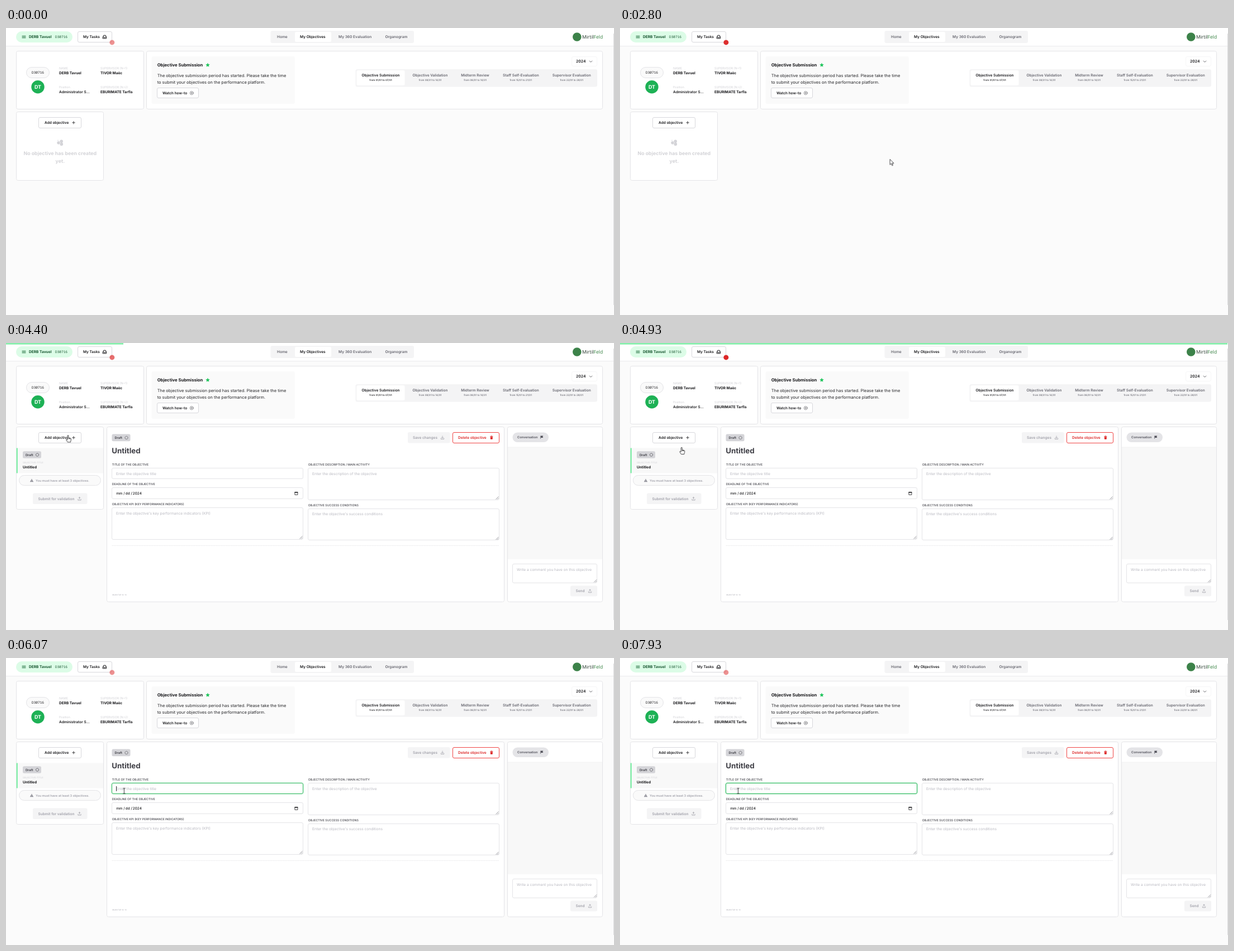
An HTML page for the animation above (8 s loop, 1088 px wide and 515 px high).

```html
<!DOCTYPE html>
<html lang="en">
<head>
<meta charset="utf-8">
<title>My Objectives</title>
<style>
html, body { margin: 0; width: 100%; height: 100%; overflow: hidden; background: #fbfbfb; }
svg { display: block; width: 100vw; height: 100vh; }
text { font: 600 6.5px Inter, "Open Sans", sans-serif; fill: #18181b; white-space: pre; text-rendering: geometricPrecision; }
.mid { text-anchor: middle; }
.mono { font: 500 6.1px "Noto Sans Mono", "DejaVu Sans Mono", monospace; }
.bold { font-weight: 700; }
.nav { font-size: 6.6px; }
.soft { fill: #66666f; }
.mute { fill: #a1a1aa; }
.label { font-size: 5.3px; font-weight: 400; fill: #cfcfd4; }
.field { font-size: 5.24px; font-weight: 500; fill: #3f3f46; }
.hint { font-size: 6.63px; font-weight: 400; fill: #b9b9c0; }
.part { font-size: 6.4px; font-weight: 500; }
.date { font-size: 4.45px; font-weight: 500; }
.body { font-size: 7.45px; font-weight: 400; fill: #27272a; }
.empty { font-size: 8.85px; font-weight: 700; fill: #d4d4d8; }

.card { fill: #fff; stroke: #e4e4e7; }
.btn { fill: #fff; stroke: #d8d8dc; }
.box { fill: #fff; stroke: #e4e4e7; }
.off { fill: #f4f4f5; }
.line { fill: none; stroke: #3f3f46; stroke-width: .8; stroke-linecap: round; stroke-linejoin: round; }
.pale { stroke: #a1a1aa; }

/* one shared 8 s timeline */
.before, .after, .caret, .arrow, .hand, .beam, .hover { animation: 8s step-end infinite; }
.before { animation-name: before; }
.after { animation-name: after; }
.caret { animation-name: caret; }
.arrow { animation-name: arrow; }
.hand { animation-name: hand; }
.beam { animation-name: beam; }
.hover { fill: #f8f8f9; animation-name: hover; }
@keyframes before { 0% { opacity: 1 } 54.9%, 100% { opacity: 0 } }
@keyframes after { 0% { opacity: 0 } 54.9%, 100% { opacity: 1 } }
@keyframes caret { 0% { opacity: 0 } 75% { opacity: 1 } 81.25% { opacity: 0 } 87.5% { opacity: 1 } 93.75%, 100% { opacity: 0 } }
@keyframes arrow { 0% { opacity: 1 } 54%, 100% { opacity: 0 } }
@keyframes hand { 0% { opacity: 0 } 54% { opacity: 1 } 68.1%, 100% { opacity: 0 } }
@keyframes beam { 0% { opacity: 0 } 68.1%, 100% { opacity: 1 } }
@keyframes hover { 0% { opacity: 0 } 43.5% { opacity: 1 } 54%, 100% { opacity: 0 } }

.press { transform-origin: 96.5px 170px; animation: press 8s linear infinite; }
@keyframes press { 0%, 46.6% { transform: none } 47.8%, 49.2% { transform: scale(.95) } 50.6%, 100% { transform: none } }

.bar { transform-origin: 0 0; animation: bar 8s linear infinite; }
@keyframes bar {
  0%, 54% { transform: scaleX(0); opacity: 1 }
  55% { transform: scaleX(.19); opacity: 1 }
  58.5%, 62.5% { transform: scaleX(1); opacity: 1 }
  65.8%, 100% { transform: scaleX(1); opacity: 0 }
}
.ring { animation: ring 8s linear infinite; }
@keyframes ring { 0%, 74.8% { opacity: 0 } 76%, 100% { opacity: 1 } }

.dot { fill: #dc2626; animation: pulse 2s cubic-bezier(.4, 0, .6, 1) -1s infinite; }
@keyframes pulse { 0%, 100% { opacity: 1 } 50% { opacity: .5 } }

.pointer { animation: roam 8s linear infinite; }
@keyframes roam {
  0%, 5.25% { transform: translate(1094px, 520px) }
  10.875% { transform: translate(976px, 430px) }
  19.125% { transform: translate(795px, 314px) }
  21.625% { transform: translate(744px, 288px) }
  32.5% { transform: translate(593px, 256px) }
  43.375% { transform: translate(117px, 167px) }
  47%, 54% { transform: translate(110.5px, 165px) }
  55%, 58% { transform: translate(111px, 165.3px) }
  66%, 66.7% { transform: translate(109.3px, 213px) }
  70.6% { transform: translate(285px, 297px) }
  74.4%, 100% { transform: translate(211.5px, 238.5px) }
}
</style>
</head>
<body>
<svg viewBox="0 0 1088 515">
  <defs>
    <g id="draft">
      <rect width="33" height="12.6" rx="2.5" fill="#d4d4d8"/>
      <text x="5" y="8.5" style="font-size:5.65px;fill:#3f3f46">Draft</text>
      <circle class="line" cx="26" cy="6.4" r="2.6" stroke-dasharray="1 1.3"/>
    </g>
    <path id="upload" d="M-2.6 1V2.8H2.6V1M0 1V-2.8M-1.5 -1.4L0 -2.9L1.5 -1.4"/>
    <path id="download" d="M-2.6 1V2.8H2.6V1M0 -2.8V1M-1.5 -.4L0 1.1L1.5 -.4"/>
    <path id="grip" d="M-5 0L0 -5M-2.3 0L0 -2.3" fill="none" stroke="#71717a" stroke-width=".7"/>
  </defs>

  <!-- header -->
  <rect width="1088" height="32" fill="#fff"/>
  <path d="M0 32.5H1087" stroke="#ebebed"/>
  <rect x="18" y="6" width="101" height="20" rx="10" fill="#dcfce7"/>
  <path class="line" d="M29 14.2H35M29 16H35M29 17.8H35" style="stroke:#166534"/>
  <text class="bold" x="41" y="18.3" style="font-size:6.6px;fill:#14532d">DERB Tavuel</text>
  <text class="mono" x="88" y="18.3" style="fill:#14532d">D30716</text>
  <rect class="btn" x="128.5" y="6.5" width="61" height="19" rx="2.5"/>
  <text x="138" y="18.3">My Tasks</text>
  <path class="line" d="M173.5 16.3L174.7 13.2H178.3L179.5 16.3V18.8H173.5ZM173.5 16.3H175.3L175.8 17.3H177.2L177.7 16.3H179.5" style="stroke:#18181b;stroke-width:1"/>
  <rect class="off" x="473.5" y="5" width="256.5" height="22" rx="3"/>
  <rect x="517" y="7" width="65" height="18" rx="2.5" fill="#fff"/>
  <text class="nav soft" x="485" y="18.3">Home</text>
  <text class="nav" x="526" y="18.3">My Objectives</text>
  <text class="nav soft" x="595" y="18.3">My 360 Evaluation</text>
  <text class="nav soft" x="678.5" y="18.3">Organogram</text>
  <circle cx="1021.8" cy="16" r="7.8" fill="#3c8249"/>
  <text x="1031" y="19.2" style="font:500 8.5px 'Open Sans',sans-serif;fill:#1f3326">Mirtil<tspan fill="#2f7d3b">Feld</tspan></text>

  <!-- profile -->
  <rect class="card" x="18.5" y="41.5" width="228" height="104" rx="3"/>
  <rect x="36.5" y="70.5" width="41" height="19" rx="9.5" fill="#fafafa" stroke="#e4e4e7"/>
  <text class="mono mid" x="57" y="82.2">D30716</text>
  <circle cx="57" cy="105.7" r="11.7" fill="#1db155"/>
  <text class="mid bold" x="57" y="109" style="font-size:9px;fill:#fff">DT</text>
  <text class="label" x="95" y="73.8">NAME</text>
  <text class="bold" x="95" y="82.8">DERB Tavuel</text>
  <text class="label" x="169" y="73.8">SUPERVISOR (N+1)</text>
  <text class="bold" x="169" y="82.8">TIVOR Maëc</text>
  <text class="label" x="95" y="107.8">Position</text>
  <text x="95" y="117.2">Administrator S...</text>
  <text class="label" x="169" y="107.8">SUPERVISOR (N+2)</text>
  <text class="bold" x="169" y="117.2">EBURIMATE Tarfis</text>

  <!-- period -->
  <rect class="card" x="251.5" y="41.5" width="816" height="104" rx="3"/>
  <rect x="260.5" y="51" width="256.5" height="85" rx="3" fill="#fafafa"/>
  <text class="bold" x="270.7" y="69" style="font-size:7.7px">Objective Submission</text>
  <path d="M361 62.4L362.1 64.9L364.8 65.2L362.8 67L363.4 69.7L361 68.3L358.6 69.7L359.2 67L357.2 65.2L359.9 64.9Z" fill="#22c55e"/>
  <text class="body" x="270.7" y="88">The objective submission period has started. Please take the time</text>
  <text class="body" x="270.7" y="99.6">to submit your objectives on the performance platform.</text>
  <rect class="btn" x="270.5" y="107.5" width="74" height="18" rx="2.5"/>
  <text x="280" y="119">Watch how-to</text>
  <circle class="line" cx="332.3" cy="116.7" r="3" style="stroke-width:.6"/>
  <path d="M331.5 115.3V118.1L333.8 116.7Z" fill="#3f3f46"/>
  <rect x="1012.5" y="51.5" width="45" height="17" rx="2.5" fill="#fff" stroke="#f6f6f7"/>
  <text x="1020" y="62.3" style="font-size:6.85px">2024</text>
  <path class="line" d="M1044.2 59L1046.5 61.3L1048.8 59"/>
  <rect class="off" x="625.5" y="74" width="432.5" height="31.5" rx="3"/>
  <rect x="627.5" y="76" width="86" height="27" rx="2.5" fill="#fff"/>
  <g class="mid">
    <text x="670.5" y="87.3">Objective Submission</text>
    <text class="date" x="670.5" y="95.3">from 01/01 to 07/01</text>
    <text class="soft" x="759" y="87.3">Objective Validation</text>
    <text class="date soft" x="759" y="95.3">from 08/01 to 14/01</text>
    <text class="soft" x="839.5" y="87.3">Midterm Review</text>
    <text class="date soft" x="839.5" y="95.3">from 08/01 to 14/01</text>
    <text class="soft" x="921.3" y="87.3">Staff Self-Evaluation</text>
    <text class="date soft" x="921.3" y="95.3">from 15/01 to 21/01</text>
    <text class="soft" x="1012.2" y="87.3">Supervisor Evaluation</text>
    <text class="date soft" x="1012.2" y="95.3">from 22/01 to 28/01</text>
  </g>

  <!-- empty list -->
  <g class="before">
    <rect class="card" x="18.5" y="150.5" width="156" height="123" rx="3"/>
    <g fill="#d4d4d8">
      <circle cx="94" cy="206" r="2.7"/>
      <circle cx="99.2" cy="203.2" r="2.8"/>
      <circle cx="99.3" cy="208.4" r="2.8"/>
      <circle cx="93" cy="201.6" r=".8"/>
    </g>
    <text class="empty mid" x="96.8" y="228">No objective has been created</text>
    <text class="empty mid" x="96.8" y="241.8">yet.</text>
  </g>

  <!-- new objective -->
  <g class="after">
    <rect class="card" x="18.5" y="150.5" width="156" height="148" rx="3"/>
    <rect x="19" y="188.5" width="155" height="45" fill="#f8f8f8"/>
    <rect x="18.5" y="188.5" width="2.5" height="45" fill="#86efac"/>
    <use href="#draft" x="30" y="194.2"/>
    <text class="label" x="30" y="216.2" style="font-size:4.25px">OBJECTIVE-TITLE</text>
    <text class="bold" x="30" y="225.2">Untitled</text>
    <rect x="23.5" y="237.5" width="146" height="18" rx="9" fill="#fafafa" stroke="#e4e4e7"/>
    <path d="M46 243.5L49.2 249.3H42.8Z" fill="#8f8f98"/>
    <path d="M46 245.3V247.2M46 248V248.5" stroke="#fff" stroke-width=".6"/>
    <text class="mute" x="53" y="248.7" style="font-size:5.55px">You must have at least 3 objectives.</text>
    <rect class="off" x="48" y="269.5" width="97.5" height="19.5" rx="2.5"/>
    <text class="mute" x="57.5" y="281.8">Submit for validation</text>
    <use href="#upload" class="line pale" x="131.5" y="279.3"/>

    <rect class="card" x="180.5" y="150.5" width="711" height="314" rx="3"/>
    <use href="#draft" x="189.5" y="163.6"/>
    <rect class="off" x="719" y="160" width="75.5" height="19.5" rx="2.5"/>
    <text class="mute" x="728" y="172.2">Save changes</text>
    <use href="#download" class="line pale" x="781" y="169.8"/>
    <rect x="799.5" y="160.5" width="83" height="19" rx="2.5" fill="#fff" stroke="#ef4444"/>
    <text x="809" y="172.2" style="fill:#dc2626">Delete objective</text>
    <path d="M866.2 167.2H871.4V168H866.2ZM867.8 166.5H869.8V167.2H867.8ZM866.6 168.6H871L870.6 172.8H867Z" fill="#dc2626"/>
    <text class="bold" x="189.3" y="197.8" style="font-size:13.3px;fill:#3f3f46">Untitled</text>

    <text class="field" x="189.8" y="220">TITLE OF THE OBJECTIVE</text>
    <rect class="box" x="189.5" y="224.5" width="342" height="19" rx="2.5"/>
    <text class="hint" x="197" y="236.6">Enter the objective title</text>
    <text class="field" x="189.8" y="255">DEADLINE OF THE OBJECTIVE</text>
    <rect class="box" x="189.5" y="259.5" width="342" height="20" rx="2.5"/>
    <text class="part" x="197.2" y="272.2">mm</text>
    <text class="part" x="210.2" y="272.2">/</text>
    <text class="part" x="213.8" y="272.2">dd</text>
    <text class="part" x="223.4" y="272.2">/</text>
    <text class="part" x="226.8" y="272.2">2024</text>
    <path d="M516.9 267.6H521.9V272.4H516.9Z" fill="none" stroke="#18181b" stroke-width=".8"/>
    <path d="M516.5 268H522.3" stroke="#18181b" stroke-width="1.3"/>
    <text class="field" x="189.8" y="291">OBJECTIVE KPI (KEY PERFORMANCE INDICATORS)</text>
    <rect class="box" x="189.5" y="295.5" width="342" height="57" rx="2.5"/>
    <text class="hint" x="197" y="307.6">Enter the objective's key performance indicators (KPI)</text>
    <use href="#grip" x="530.5" y="351.5"/>

    <text class="field" x="540.8" y="220">OBJECTIVE DESCRIPTION / MAIN ACTIVITY</text>
    <rect class="box" x="540.5" y="224.5" width="342" height="57" rx="2.5"/>
    <text class="hint" x="548" y="236.6">Enter the description of the objective</text>
    <use href="#grip" x="881.5" y="280.5"/>
    <text class="field" x="540.8" y="292.8">OBJECTIVE SUCCESS CONDITIONS</text>
    <rect class="box" x="540.5" y="297.5" width="342" height="56" rx="2.5"/>
    <text class="hint" x="548" y="309.2">Enter the objective's success conditions</text>
    <use href="#grip" x="881.5" y="353"/>
    <path d="M189.5 363.5H882.5" stroke="#e9e9eb" stroke-dasharray="2 1"/>
    <text class="label" x="189.8" y="453" style="font-size:3px;fill:#a1a1aa">OBJECTIVE-ID: 13</text>

    <rect class="card" x="897.5" y="150.5" width="170" height="314" rx="3"/>
    <rect x="906.5" y="160.5" width="64.5" height="17.5" rx="8.75" fill="#e4e4e7"/>
    <text x="915" y="171.3" style="font-size:5.65px;fill:#52525b">Conversation</text>
    <path d="M956.4 166.6H961.3L960.3 168.3L961.3 170H957.1V172H956.4Z" fill="#52525b"/>
    <rect x="898" y="187" width="169" height="201" fill="#f8f8f8"/>
    <path d="M898 187H1067" stroke="#ececee" stroke-width=".6"/>
    <rect class="box" x="906.5" y="396.5" width="151" height="34" rx="2.5"/>
    <text class="hint" x="914" y="408.6" style="font-size:6.5px">Write a comment you have on this objective</text>
    <use href="#grip" x="1057" y="429.5"/>
    <rect class="off" x="1010" y="435.5" width="48" height="19" rx="2.5"/>
    <text class="mute" x="1019.5" y="447.3">Send</text>
    <use href="#upload" class="line pale" x="1045" y="445"/>

    <g class="ring" fill="none">
      <rect x="188.5" y="223.5" width="344" height="21" rx="3.2" stroke="#d5f7e1"/>
      <rect x="189.5" y="224.5" width="342" height="19" rx="2.5" stroke="#22b455"/>
    </g>
    <rect class="caret" x="197" y="230" width=".9" height="9" fill="#18181b"/>
  </g>

  <g class="press">
    <rect class="btn" x="58.5" y="160.5" width="76" height="19" rx="2.5"/>
    <rect class="hover" x="59" y="161" width="75" height="18" rx="2"/>
    <text x="69" y="172.2">Add objective</text>
    <path class="line" d="M118.7 169.8H123.3M121 167.5V172.1" style="stroke:#18181b"/>
  </g>

  <circle class="dot" cx="189.8" cy="25.9" r="4.5"/>
  <rect class="bar" width="1087" height="2.7" fill="#86efac"/>
  <rect x="1087" y="10" width="1" height="487" fill="#d9d9dc"/>

  <g class="pointer">
    <path class="arrow" d="M0 0V9.8L2.3 7.8L3.9 11.4L5.4 10.7L3.9 7.2H7Z" fill="#fff" stroke="#18181b" stroke-width=".8"/>
    <path class="hand" d="M-1 1Q0 -.7 1 1V4.8L4.8 5.8Q5.7 6.3 5.4 8.4L4.5 12.6H-.7L-3.4 8.4Q-3.3 6.9 -2.2 7.4L-1 8.5ZM1 4.8V7M2.4 5.2V7M3.8 5.6V7.2" fill="#fff" stroke="#18181b" stroke-width=".8"/>
    <path class="beam" d="M-2.2 -4.8H-.7L0 -4.3L.7 -4.8H2.2M0 -4.3V4.3M-2.2 4.8H-.7L0 4.3L.7 4.8H2.2" fill="none" stroke="#18181b" stroke-width=".9"/>
  </g>
</svg>
</body>
</html>
```
